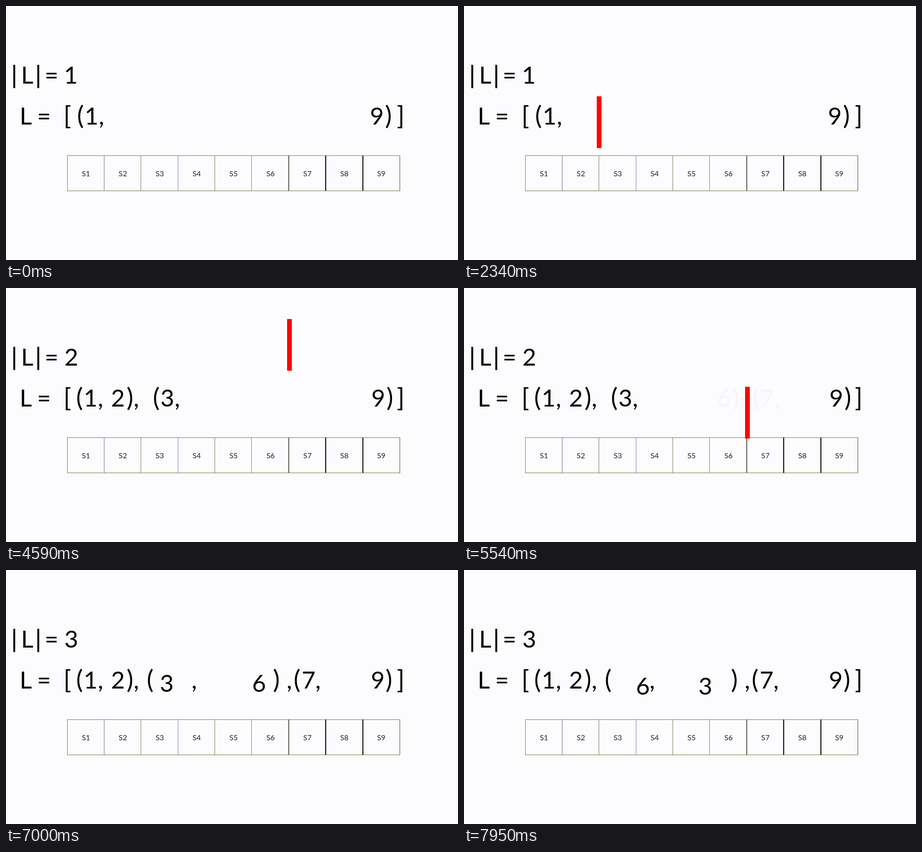
Animation, 960 px wide and 540 px high, one loop 7.99 s. Source, as an HTML page:

```html
<!DOCTYPE html>
<html lang="en">
<head>
<meta charset="utf-8">
<title>List splitting</title>
<style>
  html, body { margin: 0; width: 100%; height: 100%; overflow: hidden; background: #fcfcfe; }
  svg { display: block; width: 960px; height: 540px; }
  text { font-family: Lato, Roboto, sans-serif; }
  .label { font-size: 15.8px; fill: #222; text-anchor: middle; }
</style>
</head>
<body>
<svg id="stage" viewBox="0 0 960 540"></svg>
<script>
const LOOP = 7990;
const ROW1 = 165, ROW2 = 252;
const SECOND = 3930, THIRD = 6570;
const SIZE = 50.6, BRACKET_SIZE = 54;

const stage = document.getElementById('stage');
const pen = document.createElement('canvas').getContext('2d');

function add(parent, tag, attrs = {}, content = '') {
  const el = document.createElementNS('http://www.w3.org/2000/svg', tag);
  for (const k in attrs) el.setAttribute(k, attrs[k]);
  el.textContent = content;
  parent.appendChild(el);
  return el;
}

// Places a glyph so that its ink begins at x.
function glyph(parent, ch, x, y) {
  const size = '()[]'.includes(ch) ? BRACKET_SIZE : SIZE;
  pen.font = `${size}px Lato, Roboto, sans-serif`;
  const left = x + pen.measureText(ch).actualBoundingBoxLeft;
  add(parent, 'text', { 'font-size': size, x: left, y }, ch);
}

function row(chars, xs, y = ROW2, parent = stage) {
  const g = add(parent, 'g');
  [...chars].forEach((ch, i) => glyph(g, ch, xs[i], y));
  return g;
}

function line(x, y, w, h, fill) {
  return add(stage, 'rect', { x, y, width: w, height: h, fill });
}

function drawGrid() {
  const edges = [130, 208, 286, 365, 443, 521, 599.5, 678, 757, 836];
  const inks = ['#7a7836', '#6c6a94', '#77775f', '#7a78c0', '#777755',
                '#7a78c0', '#555548', '#000', '#000', '#4a4820'];
  line(130, 317.5, 707, 1, '#77752f');
  line(130, 392.5, 707, 1, '#77752f');
  edges.forEach((x, i) => {
    line(x, 318, i > 5 && i < 9 ? 2 : 1, 75, inks[i]);
    if (i < 9) add(stage, 'text', { class: 'label', x: 169.8 + i * 78.4, y: 362 }, 'S' + (i + 1));
  });
}

line(15.5, 125, 4, 49.5, '#000');
line(66.5, 125, 4, 49.5, '#000');
row('L=', [36, 85], ROW1);
row('L=[]', [33, 69, 126, 831]);
drawGrid();

const counts = [row('1', [127], ROW1), row('2', [126], ROW1), row('3', [126], ROW1)];

const lists = [
  row('(1,9)', [153, 171, 199, 775, 806]),
  row('(1,2),(3,9)', [151, 169, 197, 225, 257, 273, 314, 330, 360, 778, 809]),
  row('(1,2),(,),(7,9)', [151, 169, 197, 225, 257, 273, 301, 396, 568, 598, 613, 630, 659, 777, 807])
];
const additions = [
  row('2)(3,', [232, 263, 318, 334, 364], ROW2, lists[0]),
  row('6),(7,', [540, 571, 586, 615, 631, 661], ROW2, lists[1])
];
const movers = [
  { el: row('3', [0], ROW2, lists[2]), from: 317, to: 549 },
  { el: row('6', [0], ROW2, lists[2]), from: 535.5, to: 322 }
];
const bars = [
  { el: line(282, 0, 10, 110, '#f00'), start: 990, from: 53, to: 197 },
  { el: line(597, 0, 10, 110, '#f00'), start: 3990, from: 65.7, to: 210 }
];

const ramp = (t, start, length) => Math.min(1, Math.max(0, (t - start) / length));
const ease = u => u * u * u * (10 + u * (6 * u - 15));
const mix = (a, b, p) => a + (b - a) * p;
const fade = (el, v) => el.setAttribute('opacity', v);

function draw(t) {
  const slide = t < SECOND ? 0 : t < THIRD ? 1 : 2;
  lists.forEach((el, i) => fade(el, i === slide ? 1 : 0));

  // Each bar fades in, drops, splits the list, then fades out through pink.
  const shown = bars.map((b, i) => {
    const split = ramp(t, b.start + 1540, 500);
    const gone = ramp(t, b.start + 2040, 500);
    b.el.setAttribute('y', mix(b.from, b.to, ease(ramp(t, b.start + 550, 960))));
    b.el.setAttribute('fill', gone > 0 ? '#ff0020' : '#f00');
    fade(b.el, ramp(t, b.start, 500) * (1 - gone));
    fade(additions[i], split);
    return split;
  });
  fade(counts[0], 1 - shown[0]);
  fade(counts[1], shown[0] * (1 - shown[1]));
  fade(counts[2], shown[1]);

  // The two numbers trade places along a shallow arc.
  const p = ease(ramp(t, 6620, 2000));
  const dip = 33 * Math.sqrt(p * (1 - p));
  for (const m of movers) {
    m.el.setAttribute('transform', `translate(${mix(m.from, m.to, p)} ${dip})`);
  }
}

function tick() {
  draw(performance.now() % LOOP);
  requestAnimationFrame(tick);
}
tick();
</script>
</body>
</html>
```
